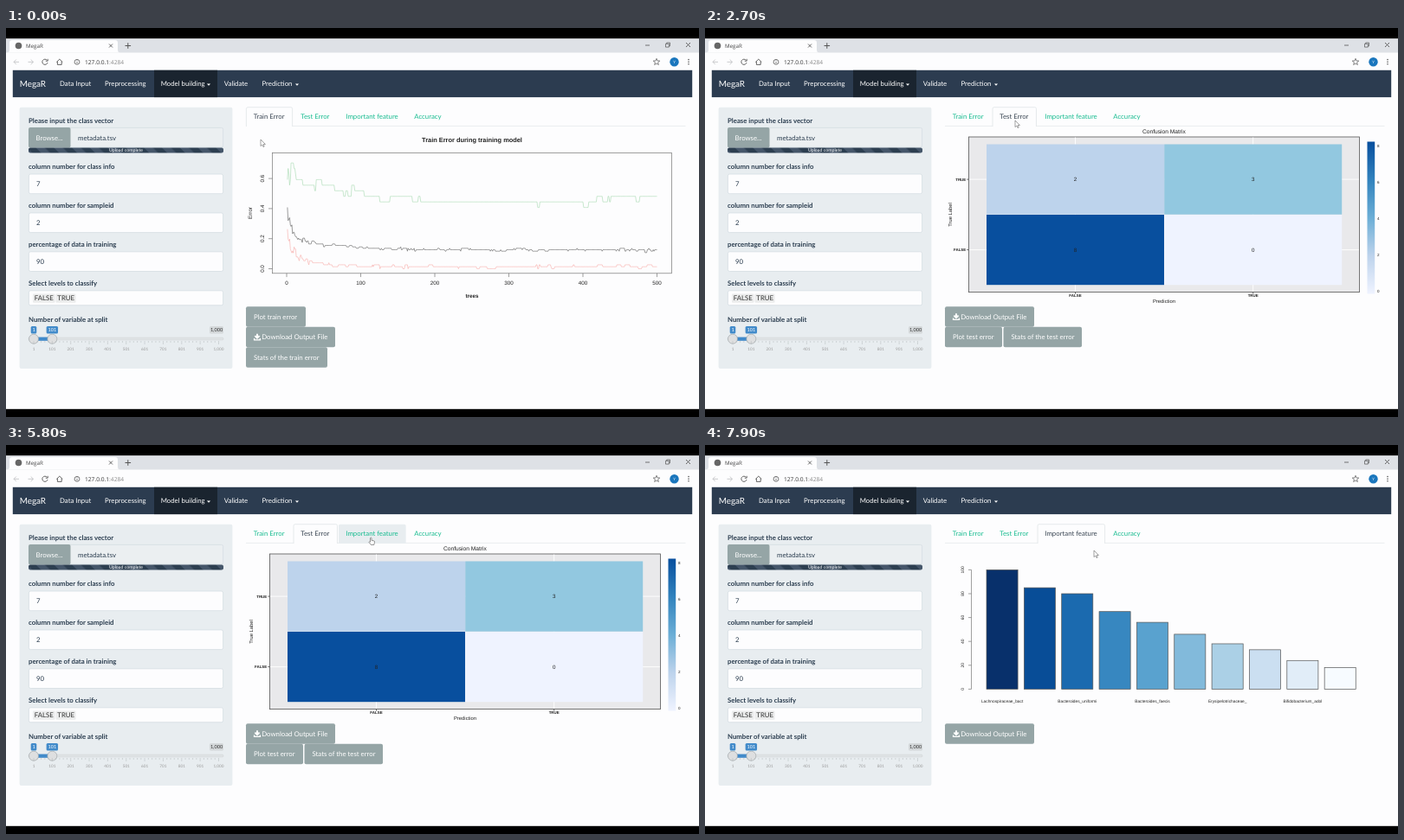
Recreate the animation shown at these times as an HTML page. Size 800x450 px, loop 8000 ms.

```html
<!DOCTYPE html>
<html lang="en">
<head>
<meta charset="utf-8">
<title>Model building</title>
<style>
  html, body { margin: 0; width: 100%; height: 100%; overflow: hidden; background: #fdfdfe; }
  svg { display: block; width: 800px; height: 450px; }
  text { text-rendering: geometricPrecision; white-space: pre; }
  .lato { font-family: Lato, sans-serif; }
  .ui { font-family: "Open Sans", "Noto Sans", sans-serif; }
  .plot { font-family: "Liberation Sans", Arial, sans-serif; }
</style>
</head>
<body>
<svg id="stage" viewBox="0 0 800 450"></svg>
<script>
const PAPER = '#fdfdfe', NAVY = '#2c3e50', GREY = '#95a5a6', GREEN = '#18bc90', PALE = '#e8edf0', INK = '#222', AXIS = '#777';

// ---- drawing helpers (all return SVG markup) ----
const each = (n, fn) => Array.from({ length: n }, (_, i) => fn(i)).join('');
const rect = (x, y, w, h, fill, extra = '') => `<rect x="${x}" y="${y}" width="${w}" height="${h}" fill="${fill}" ${extra}/>`;
const path = (d, stroke, width = 0.7, fill = 'none') => `<path d="${d}" stroke="${stroke}" stroke-width="${width}" fill="${fill}"/>`;
const circle = (x, y, r, fill, extra = '') => `<circle cx="${x}" cy="${y}" r="${r}" fill="${fill}" ${extra}/>`;
// y is the visual middle of the line
const text = (x, y, str, { size = 7.8, fill = NAVY, font = 'lato', anchor = 'start', bold, turn } = {}) =>
  `<text class="${font}" x="${x}" y="${y + size * 0.35}" font-size="${size}" fill="${fill}" text-anchor="${anchor}"` +
  `${bold ? ' font-weight="700"' : ''}${turn ? ` transform="rotate(-90 ${x} ${y})"` : ''}>${str}</text>`;
const centred = (x, y, str, size, fill, more) => text(x, y, str, { size, fill, anchor: 'middle', ...more });
const plotText = (x, y, str, size, more) => centred(x, y, str, size, INK, { font: 'plot', ...more });
const caret = x => path(`M${x - 2.1} 64.6h4.2l-2.1 2.2z`, 'none', 0, '#fff');

function button(x, width, row, label) {
  const y = 322.2 + row * 23.5;
  const icon = label.startsWith('Download');
  return rect(x, y, width, 23.6, GREY, 'rx="2"') + text(x + (icon ? 18.2 : 9), y + 12, label, { fill: '#fff' }) +
    (icon ? path(`M${x + 13} ${y + 8}v5m-2.6-2.6l2.6 2.6l2.6-2.6`, '#fff', 1.9) +
      path(`M${x + 9.6} ${y + 13.2}v2h6.8v-2`, '#fff', 1.4) : '');
}

// ---- browser window ----
function browser() {
  const ink = '#555', ui = (x, y, s, size, fill) => text(x, y, s, { size, fill, font: 'ui' });
  const arrow = (x, dir) => path(`M${x - dir * 3} 39.3h${dir * 6}m${-dir * 2.8}-2.8l${dir * 2.8} 2.8l${-dir * 2.8} 2.8`, '#c4c6c8', 0.9);
  const cross = (x, y, r) => path(`M${x - r} ${y - r}l${2 * r} ${2 * r}m0 ${-2 * r}l${-2 * r} ${2 * r}`, ink, 0.9);
  const star = each(10, i => {
    const r = i % 2 ? 1.7 : 4, a = i * Math.PI / 5;
    return `${751 + r * Math.sin(a)},${39.3 - r * Math.cos(a)} `;
  });
  return rect(0, 0, 800, 12.4, '#000') + rect(0, 440.8, 800, 9.2, '#000') + rect(0, 12.4, 800, 16.1, '#dee1e6') +
    path('M1 28.5Q4 28.5 4 25V17Q4 14 7 14H126Q129 14 129 17V25Q129 28.5 132 28.5Z', 'none', 0, PAPER) +
    circle(14.5, 20.5, 3.8, '#666') + ui(23, 20.5, 'MegaR', 6.2, '#444') +
    cross(121, 20.5, 2) + path('M137.5 20.5h6.6m-3.3-3.3v6.6', ink, 1) +
    path('M738 20h5', ink, 0.8) + path('M761.5 18.3h3.8v3.8h-3.8zM762.7 18.3v-1.3h3.8v3.8h-1.2', ink) + cross(787.5, 19.5, 2.5) +
    arrow(12, -1) + arrow(28.5, 1) +
    path('M47.3 37.2a3.1 3.1 0 1 0 .7 2.8M48.2 35.8v2.4h-2.4', ink, 0.9) +
    path('M58.3 39.5l3.5-3.4l3.5 3.4M59.4 38.7v3.7h4.8v-3.7', ink, 0.9) +
    circle(82, 39.3, 2.9, 'none', `stroke="${ink}" stroke-width=".8"`) + path('M82 39v1.9M82 37.4v.8', ink, 0.8) +
    ui(91, 39.3, '127.0.0.1<tspan fill="#888">:4284</tspan>', 6.65, '#333') +
    `<polygon points="${star}" fill="none" stroke="${ink}" stroke-width=".7"/>` +
    circle(771.5, 39.2, 5.2, '#1a76bd') + centred(771.5, 39.2, 'Y', 4.6, '#fff', { font: 'ui' }) +
    each(3, i => circle(788, 36.6 + i * 2.6, 0.8, ink));
}

function navbar() {
  const item = (x, label) => text(x, 64.5, label, { fill: '#fff' });
  return rect(7.8, 48.8, 784.4, 31.3, '#2c3c50') + rect(171, 48.8, 73, 31.3, '#1a242f') +
    text(15.7, 64.3, 'MegaR', { size: 9.9, fill: '#fff' }) +
    item(62, 'Data Input') + item(114, 'Preprocessing') + item(178.7, 'Model building') + caret(234) +
    item(251.8, 'Validate') + item(295.5, 'Prediction') + caret(336);
}

// ---- settings panel ----
function slider() {
  const tag = (x, width, s, fill, ink) => rect(x - width / 2, 345, width, 8.4, fill, 'rx="1.5"') + centred(x, 349.2, s, 5.6, ink);
  const handle = x => circle(x, 359.7, 5.5, '#dedfe0', 'stroke="#a3a8ab" stroke-width=".7"');
  const step = 21.35, from = 32, to = from + step;
  return rect(26, 358, 225, 3, '#dfe3e5', 'rx="1.5" stroke="#c9cdd0" stroke-width=".4"') +
    rect(from, 357.6, step, 4.2, '#428bca') + handle(from) + handle(to) +
    tag(from, 6.6, '1', '#428bca', '#fff') + tag(to, 13.4, '101', '#428bca', '#fff') + tag(243, 16, '1,000', '#d4d8da', '#333') +
    each(51, i => path(`M${from + i * step / 5} 362v${i % 5 ? 2 : 4}`, '#b5babd', 0.5)) +
    each(11, i => centred(from + i * step, 371, i < 10 ? i * 100 + 1 : '1,000', 4.7, '#999'));
}

function sidebar() {
  const edge = 'stroke="#d5dde3" stroke-width=".8" rx="2"';
  const label = (y, s) => text(26, y, s, { bold: true });
  const chip = (x, width, s) => rect(x, 307.5, width, 10.2, '#ebecec', 'rx="1"') + text(x + 1.8, 312.5, s, { fill: '#333' });
  const inputs = [['column number for class info', 7], ['column number for sampleid', 2], ['percentage of data in training', 90]];
  return rect(15.6, 91.7, 245.8, 302.3, PALE, 'rx="2"') +
    label(107, 'Please input the class vector') +
    rect(26.4, 115.4, 224.2, 22.6, '#ebeff1', edge) + rect(26, 115, 48.5, 23.4, GREY, 'rx="2"') +
    text(34.5, 127, 'Browse...', { fill: '#fff' }) + text(83, 127, 'metadata.tsv') +
    `<pattern id="stripes" width="14.7" height="14.7" patternUnits="userSpaceOnUse" patternTransform="rotate(-45)">
      ${rect(0, 0, 14.7, 14.7, NAVY)}${rect(0, 0, 7.35, 14.7, '#45566a')}</pattern>` +
    rect(26, 138.6, 225, 5.8, 'url(#stripes)', 'rx="2"') + centred(138.5, 141.5, 'Upload complete', 5.25, '#fff') +
    inputs.map(([name, value], i) => {
      const y = 160.7 + i * 44.9;
      return label(y, name) + rect(26.4, y + 8.3, 224.2, 22.7, PAPER, edge) + text(35, y + 19.7, value);
    }).join('') +
    label(295.5, 'Select levels to classify') + rect(26.4, 303.8, 224.2, 17, PAPER, edge) +
    chip(31, 25.5, 'FALSE') + chip(57.5, 23, 'TRUE') +
    label(337, 'Number of variable at split') + slider();
}

// ---- tab contents ----
const treeX = tree => 324 + tree * 0.855, errorY = e => 278.5 - e * 174;

// Error rates are whole counts out of `total`; an offset hops at random and stays, wilder for the first trees.
function errorCurve(color, trend, total, wobble, hop, seed) {
  const random = () => (seed = (seed * 16807) % 2147483647) / 2147483647;
  let offset = 0;
  return path('M' + Array.from({ length: 500 }, (_, i) => {
    const early = Math.exp(-i / 14);
    if (random() < hop + early) offset = (random() * 2 - 1) * wobble * (1 + 3 * early);
    else if (random() < hop) offset = 0;
    const e = Math.round((trend(i) + offset) * total) / total;
    return `${treeX(i + 1).toFixed(1)} ${errorY(Math.max(e, 0)).toFixed(1)}`;
  }).join('L'), color, 0.65);
}

function trainPanel() {
  const fall = (i, size, span) => size * Math.exp(-i / span);
  return plotText(538, 129.4, 'Train Error during training model', 7.4, { bold: true }) +
    errorCurve('#acdcb5', i => .433 + 1.5e-6 * (i - 300) ** 2 + fall(i, .07, 50), 27, .03, .08, 71) +
    errorCurve('#666', i => .122 + fall(i, .07, 80) + fall(i, .17, 8), 103, .011, .25, 53) +
    errorCurve('#f7b0ad', i => .014 + fall(i, .06, 40) + fall(i, .16, 8), 76, .011, .12, 29) +
    rect(307.5, 144.5, 461, 139.3, 'none', `stroke="${AXIS}" stroke-width=".7"`) +
    each(6, i => path(`M${treeX(i * 100)} 283.8v4.3`, AXIS) + plotText(treeX(i * 100), 295.3, i * 100, 6.25)) +
    each(4, i => path(`M303 ${errorY(i / 5)}h4.5`, AXIS) + plotText(296, errorY(i / 5), (i / 5).toFixed(1), 6.25, { turn: true })) +
    plotText(282, 214, 'Error', 6.25, { turn: true }) + plotText(538, 310, 'trees', 6.25, { bold: true }) +
    button(277, 69, 0, 'Plot train error') + button(277, 103, 1, 'Download Output File') + button(277, 94, 2, 'Stats of the train error');
}

function testPanel() {
  const x = i => 427.5 + i * 205.2, y = i => 256.6 - i * 81.5;
  const cell = (col, row, n, fill) => rect(x(col) - 102.5, y(row) - 40.6, 205, 81.2, fill) + plotText(x(col), y(row), n, 6.2);
  const ramp = ['#eff3ff', '#bdd3ec', '#6baed6', '#3182bd', '#084f9e'];
  return `<linearGradient id="ramp" x1="0" y1="1" x2="0" y2="0">` +
    ramp.map((c, i) => `<stop offset="${i / 4}" stop-color="${c}"/>`).join('') + '</linearGradient>' +
    plotText(530, 119.2, 'Confusion Matrix', 6.65) +
    rect(304.4, 126, 451.2, 179.6, '#e9e9eb', 'stroke="#555" stroke-width=".8"') +
    each(2, i => path(`M305 ${y(i)}H755M${x(i)} 126.5V305`, '#fff', 0.9)) +
    cell(0, 1, 2, ramp[1]) + cell(1, 1, 3, '#92c8e0') + cell(0, 0, 8, ramp[4]) + cell(1, 0, 0, ramp[0]) +
    ['FALSE', 'TRUE'].map((s, i) => path(`M302.3 ${y(i)}h2M${x(i)} 305.6v2`, INK) +
      plotText(301.3, y(i), s, 4.45, { bold: true, anchor: 'end' }) + plotText(x(i), 309.8, s, 4.45, { bold: true })).join('') +
    plotText(282.5, 216, 'True Label', 5.8, { turn: true }) + plotText(530, 316, 'Prediction', 5.85) +
    rect(764.5, 131.5, 8.7, 176, 'url(#ramp)') +
    each(5, i => plotText(776, 304.3 - i * 42, i * 2, 4.5, { anchor: 'start' })) +
    button(277, 103, 0, 'Download Output File') + button(277, 66, 1, 'Plot test error') + button(344.5, 90.5, 1, 'Stats of the test error');
}

function featurePanel() {
  const importance = [100, 85, 80, 65, 56, 46, 38, 33, 24, 18];
  const names = ['Lachnospiraceae_bact', 'Bacteroides_uniformi', 'Bacteroides_faecis', 'Erysipelotrichaceae_', 'Bifidobacterium_adol'];
  const blues = ['#08306b', '#08519c', '#2171b5', '#4292c6', '#6baed6', '#9ecae1', '#c6dbef', '#deebf7', '#f7fbff'];
  const shade = i => {
    const at = i * 8 / 9, k = Math.floor(at);
    return `color-mix(in srgb, ${blues[k]}, ${blues[Math.min(k + 1, 8)]} ${(at - k) * 100}%)`;
  };
  const y = v => 282.4 - v * 1.38, pitch = 43.35;
  return importance.map((v, i) =>
    rect(325 + i * pitch, y(v), 36.1, v * 1.38, 'none', `style="fill:${shade(i)}" stroke="#555" stroke-width=".7"`)).join('') +
    path(`M307.5 ${y(100)}V${y(0)}`, AXIS) +
    each(6, i => path(`M304 ${y(i * 20)}h3.5`, AXIS) + plotText(297, y(i * 20), i * 20, 4.9, { turn: true })) +
    names.map((s, i) => plotText(343.1 + i * 2 * pitch, 296, s, 4.8)).join('') +
    button(277, 103, 0, 'Download Output File');
}

// ---- tabs ----
const TABS = [[277.4, 53.2, 'Train Error'], [332, 50.5, 'Test Error'], [384, 77.6, 'Important feature'], [463, 48.5, 'Accuracy']];
const tabBar = (active, hovered) => path('M277 113.4H784.5', '#e6eaec', 0.8) + TABS.map(([x, w, label], i) => {
  const shape = `M${x} 113.9v-20.4q0-1.8 1.8-1.8h${w - 3.6}q1.8 0 1.8 1.8v20.4`;
  return (i === active ? path(shape, '#e0e5e8', 0.8, PAPER) : i === hovered ? path(shape, 'none', 0, PALE) : '') +
    text(x + 8.3, 102.6, label, { fill: i === active ? '#3a4653' : GREEN });
}).join('');

// ---- pointer: each leg is [start, end, x, y] ----
const LEGS = [[600, 1500, 358, 107], [4000, 4100, 358, 110], [4100, 4900, 522, 286], [4900, 5800, 421, 107], [7500, 7900, 449, 122]];
const pointerAt = t => LEGS.reduce(([x, y], [start, end, toX, toY]) => {
  const u = Math.min(Math.max((t - start) / (end - start), 0), 1), e = u * u * (3 - 2 * u);
  return [x + (toX - x) * e, y + (toY - y) * e];
}, [294, 129]);
const ARROW = path('M0 0V7.6L1.8 6L3 8.6L4.2 8L3.1 5.5H5.4Z', '#666', 0.6, '#fff');
const HAND = path('M-.5 .6Q.4-.4 1 .6V3.3L4 4Q4.7 4.3 4.5 5.2L3.8 8.5H.3L-2 5.4Q-1.7 4.3-.5 5.2Z', '#555', 0.6, '#fff');

const stage = document.getElementById('stage');
stage.innerHTML = rect(0, 0, 800, 450, PAPER) + browser() + navbar() + sidebar() + '<g id="tabs"></g>' +
  [trainPanel, testPanel, featurePanel].map(panel => `<g class="panel">${panel()}</g>`).join('') + '<g id="pointer"></g>';
const tabs = document.getElementById('tabs'), pointer = document.getElementById('pointer');
const panels = [...document.querySelectorAll('.panel')];

function draw(now) {
  const t = Math.floor((now % 8000) / 100) * 100; // ten pictures a second
  const active = t < 2700 ? 0 : t < 6400 ? 1 : 2;
  const [x, y] = pointerAt(t);
  const over = y < 114 ? TABS.findIndex(([left, w]) => x >= left && x <= left + w) : -1;
  tabs.innerHTML = tabBar(active, over);
  panels.forEach((panel, i) => panel.setAttribute('display', i === active ? 'inline' : 'none'));
  pointer.setAttribute('transform', `translate(${x} ${y})`);
  pointer.innerHTML = over >= 0 && over !== active ? HAND : ARROW;
}

const start = performance.now();
(function loop() {
  draw(performance.now() - start);
  requestAnimationFrame(loop);
})();
</script>
</body>
</html>
```
